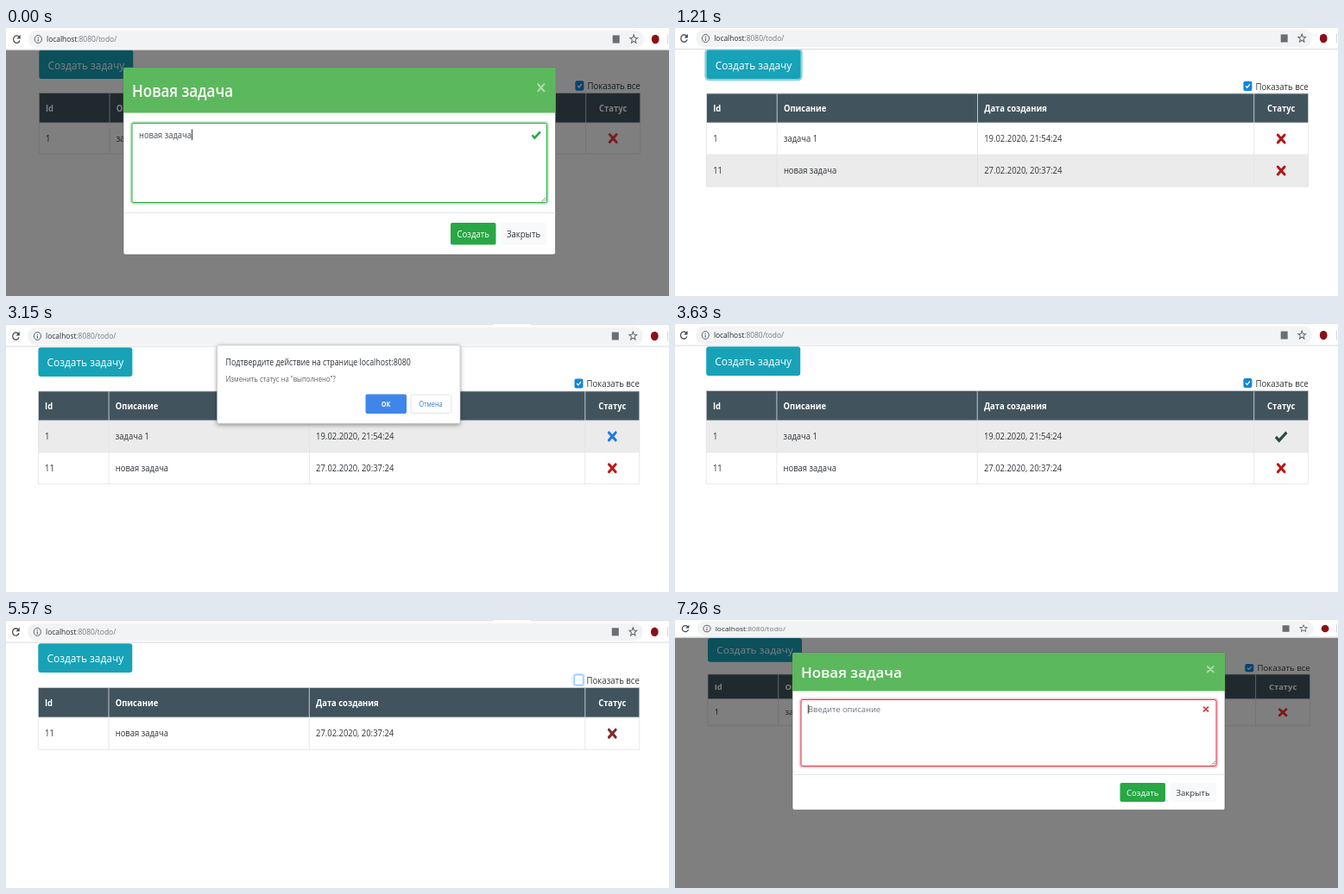
An HTML page that plays this animation: 768 by 311 pixels, repeating every 8470 ms.

```html
<!DOCTYPE html>
<html lang="ru">
<head>
<meta charset="utf-8">
<title>Задачи</title>
<style>
html, body { margin: 0; width: 100%; height: 100%; overflow: hidden; background: #fff; }
svg { display: block; width: 768px; height: 311px; }
text { font-family: "Open Sans", "Noto Sans", sans-serif; white-space: pre; }
.scene { visibility: hidden; animation: show 8.47s step-end infinite; }
@keyframes show {
  0% { visibility: visible; }
  14.2857%, 100% { visibility: hidden; }
}
</style>
</head>
<body>
<svg id="stage" viewBox="0 0 768 311">
  <defs>
    <filter id="shadow" x="-10%" y="-10%" width="120%" height="130%">
      <feDropShadow dx="0" dy="1.5" stdDeviation="2.5" flood-opacity=".4"/>
    </filter>
  </defs>
</svg>
<script>
const HOLD = 1.21;
const SX = 0.625; // the page is shown narrower than it is tall
let sy = 0.7;

const rect = (x, y, w, h, fill, extra = '') =>
  `<rect x="${x}" y="${y}" width="${w}" height="${h}" fill="${fill}" ${extra}/>`;
const line = (x1, y1, x2, y2, color = '#dee2e6', w = 0.8) =>
  `<path d="M${x1} ${y1}L${x2} ${y2}" stroke="${color}" stroke-width="${w}"/>`;
const at = (x, y) => `transform="translate(${x} ${y}) scale(${SX} ${sy})"`;

// Text is centred vertically on y.
function text(x, y, str, { size = 15.1, fill = '#30353a', weight = 400, anchor = 'start' } = {}) {
  return `<text ${at(x, y + size * 0.36 * sy)} font-size="${size}" fill="${fill}" ` +
    `font-weight="${weight}" text-anchor="${anchor}">${str}</text>`;
}
const stroke = (x, y, d, color, w, cap = 'butt') =>
  `<path ${at(x, y)} d="${d}" fill="none" stroke="${color}" stroke-width="${w}" stroke-linecap="${cap}"/>`;

function cross(x, y, color, r = 6.2, w = 4.6) {
  return stroke(x, y, `M${-r} ${-r}L${r} ${r}M${r} ${-r}L${-r} ${r}`, color, w, 'round');
}
const tick = (x, y, color, s = 1) =>
  stroke(x, y, `M${-10 * s} ${s}L${-4 * s} ${7 * s}L${10 * s} ${-6.5 * s}`, color, 5 * s);

function star(x, y) {
  let d = '';
  for (let i = 0; i < 10; i++) {
    const r = i % 2 ? 3.2 : 7.4, a = i * Math.PI / 5;
    d += `${i ? 'L' : 'M'}${(r * Math.sin(a)).toFixed(2)} ${(-r * Math.cos(a)).toFixed(2)}`;
  }
  return stroke(x, y, d + 'Z', '#5f6368', 1.5);
}

function chrome({ left, right, bar, urlY, tabs }) {
  const top = urlY - 14.5 * sy, h = 29 * sy;
  const info = left - 1;
  return rect(0, 0, 768, bar, '#fff') +
    (tabs ? rect(0, 0, 565, 1, '#dee1e6') + rect(607, 0, 161, 1, '#dee1e6') : '') +
    rect(left - 12, top, right - left + 16, h, '#f1f3f4', `rx="9" ry="${h / 2}"`) +
    line(0, bar - 0.5, 768, bar - 0.5, '#d9dbde', 1) +
    stroke(left - 26, urlY, 'M5.2-3A6 6 0 1 0 5.8 2', '#4a4d51', 2) +
    `<path ${at(left - 26, urlY)} d="M7-7.5V-.8H.3Z" fill="#4a4d51"/>` +
    `<ellipse cx="${info}" cy="${urlY}" rx="4.1" ry="${6.5 * sy}" fill="none" stroke="#5f6368"/>` +
    stroke(info, urlY, 'M0-3.6V-1.8M0-.4V4', '#5f6368', 1.8) +
    text(left + 8.7, urlY, 'localhost<tspan fill="#777b80">:8080/todo/</tspan>', { size: 13.5, fill: '#2b2e32' }) +
    rect(right - 32, urlY - 6.5 * sy, 8, 13 * sy, '#6b6f74') +
    star(right - 7.5, urlY) +
    `<ellipse cx="${right + 17.5}" cy="${urlY}" rx="4.4" ry="${7.4 * sy}" fill="#8a0f18"/>` +
    line(766.5, urlY - 8 * sy, 766.5, urlY + 8 * sy, '#d5d7da', 1);
}

function checkbox(x, y, checked) {
  const h = 16 * sy, top = y - h / 2;
  if (checked) {
    return rect(x, top, 10, h, '#0f87dc', 'rx="2"') +
      stroke(x + 5, y, 'M-3.8 0L-1 2.8L4-2.8', '#fff', 2);
  }
  return rect(x - 1, top - 1, 12, h + 2, '#fff', 'rx="3" stroke="#bfdeff" stroke-width="2"') +
    rect(x, top, 10, h, '#fff', 'rx="2" stroke="#80bdff" stroke-width=".8"');
}

function page(s) {
  const { left, right, button, head, rows, dateCol = 314 } = s;
  const width = right - left;
  const cols = [left, left + 81.7, left + dateCol, right - 63];
  const pad = 7.7;
  const headMid = (head[0] + head[1]) / 2;
  const bold = { weight: 700, fill: '#fff' };
  let y = head[1];
  let out = rect(0, 0, 768, 311, '#fff');

  if (s.focus) {
    out += rect(left - 1, button[0] - 1, 111, button[1] - button[0] + 2, 'none',
      'rx="4" stroke="#8bd0db" stroke-width="2.4"');
  }
  out += rect(left, button[0], 109, button[1] - button[0], '#17a2b8', 'rx="3"') +
    text(left + 54.5, (button[0] + button[1]) / 2 + 0.5, 'Создать задачу', { size: 19.1, fill: '#fff', anchor: 'middle' }) +
    checkbox(right - 75.3, s.checkY, !s.unchecked) +
    text(right, s.checkY + 0.5, 'Показать все', { size: 15.4, anchor: 'end' }) +
    rect(left, head[0], width, head[1] - head[0], '#41545d');
  ['Id', 'Описание', 'Дата создания'].forEach((name, i) => {
    out += text(cols[i] + pad, headMid, name, bold);
  });
  out += text(right - 31.5, headMid, 'Статус', { ...bold, anchor: 'middle' });

  for (const { id, name, date, icon, hover } of rows) {
    const mid = y + s.rowH / 2;
    if (hover) out += rect(left, y, width, s.rowH, '#ebebeb');
    out += [id, name, date].map((v, i) => text(cols[i] + pad, mid, v)).join('') +
      (icon === 'done' ? tick(right - 31.5, mid, '#2b4a40') : cross(right - 31.5, mid, icon));
    y += s.rowH;
    out += line(left, y, right, y);
  }
  for (const x of [...cols, right]) out += line(x, head[0], x, y);
  out += line(left, head[0], right, head[0], '#c9d0d4') + line(left, head[1], right, head[1]);
  return out;
}

function modal({ x, w, top, headEnd, area, foot, buttons, end, value, valid }) {
  const r = x + w, color = valid ? '#28a745' : '#dc3545';
  const glow = valid ? '#bfe5c7' : '#f6cdd1';
  const [a, b] = area, [c, d] = buttons;
  const valueY = a + 19 * sy, mid = (c + d) / 2;
  const caret = valid ? x + 79.5 : x + 18.3;
  const label = { size: 15.3, anchor: 'middle' };
  return rect(x, top, w, end - top, '#fff', 'rx="2.5" stroke="#5d5d5d" stroke-width=".6"') +
    `<path d="M${x} ${headEnd}V${top + 2.5}q0-2.5 2.5-2.5H${r - 2.5}q2.5 0 2.5 2.5V${headEnd}Z" fill="#5cb85c"/>` +
    text(x + 10, (top + headEnd) / 2 + 1, 'Новая задача', { size: 27.2, weight: 600, fill: '#fff' }) +
    cross(r - 16.7, top + 33 * sy, '#aedcae', 5.6, 3.2) +
    rect(x + 9, a - 1, w - 18, b - a + 2, 'none', `rx="3" stroke="${glow}" stroke-width="2.6"`) +
    rect(x + 10, a, w - 20, b - a, '#fff', `rx="2" stroke="${color}" stroke-width="1"`) +
    text(x + 18, valueY, value, { size: 15, fill: valid ? '#495057' : '#6c757d' }) +
    line(caret, valueY - 9 * sy, caret, valueY + 9 * sy, '#222', 0.9) +
    (valid ? tick(r - 22.3, valueY, color, 0.75) : cross(r - 22, valueY, '#c9444f', 4, 3.2)) +
    line(r - 16, b - 1, r - 11, b - 6, '#777') + line(r - 13.5, b - 1, r - 11, b - 3.5, '#777') +
    line(x, foot, r, foot) +
    rect(r - 121.5, c, 52.5, d - c, '#28a745', 'rx="2"') +
    rect(r - 63.5, c, 53.5, d - c, '#f8f9fa', 'rx="2"') +
    text(r - 95.3, mid + 0.5, 'Создать', { ...label, fill: '#fff' }) +
    text(r - 37, mid + 0.5, 'Закрыть', label);
}

function confirmBox() {
  const label = { size: 11.6, anchor: 'middle' };
  return rect(244.5, 24.5, 281.5, 91, '#fff', 'rx="2" stroke="#b5b5b5" stroke-width=".6" filter="url(#shadow)"') +
    text(254.5, 44, 'Подтвердите действие на странице localhost:8080', { size: 14.1 }) +
    text(254.5, 64, 'Изменить статус на "выполнено"?', { size: 12.3, fill: '#5f6368' }) +
    rect(416.5, 81.5, 47.5, 22.5, '#3f86ea', 'rx="2"') +
    rect(469, 82, 47, 21.5, '#fff', 'rx="2" stroke="#dadce0" stroke-width=".8"') +
    text(440, 92.8, 'ОК', { ...label, fill: '#fff', weight: 700 }) +
    text(492, 92.8, 'Отмена', { ...label, fill: '#2f7ad0' });
}

const RED = '#b01717';
const first = (icon, hover) => ({ id: '1', name: 'задача 1', date: '19.02.2020, 21:54:24', icon, hover });
const second = (icon, hover) => ({ id: '11', name: 'новая задача', date: '27.02.2020, 20:37:24', icon, hover });

const scenes = [
  { k: 0.704, left: 38.3, right: 734.7, bar: 25.5, urlY: 13, button: [25.5, 59], checkY: 67,
    head: [75.5, 110], rowH: 36, rows: [first('#f03a34')],
    modal: { x: 136, w: 500.5, top: 46, headEnd: 98.5, area: [110.5, 202.5], foot: 214.5,
      buttons: [226, 251.5], end: 263, value: 'новая задача', valid: true } },
  { k: 0.7, left: 36.5, right: 733.7, bar: 25, urlY: 12, button: [25.5, 59], checkY: 67.3, focus: true,
    head: [76, 110], rowH: 37, rows: [first(RED), second(RED, true)] },
  { k: 0.7, left: 37.4, right: 733.8, bar: 26.5, urlY: 14, tabs: true, button: [27.3, 61], checkY: 69,
    head: [78, 112], rowH: 36.8, rows: [first('#1f7ae6', true), second('#c01616')], confirm: true },
  { k: 0.7, left: 36.2, right: 733.7, bar: 25.5, urlY: 13, button: [26.3, 60], checkY: 68.5,
    head: [77.5, 112], rowH: 36.8, rows: [first('done', true), second('#b81616')] },
  { k: 0.7, left: 37.3, right: 733.8, bar: 26.5, urlY: 13.8, tabs: true, button: [27.3, 61], checkY: 69.5, unchecked: true,
    head: [78.5, 113], rowH: 37.3, rows: [second('#84282b')] },
  { k: 0.685, left: 38.5, right: 733.4, bar: 23.5, urlY: 11.2, button: [24, 57], checkY: 65.5, dateCol: 289,
    head: [73.5, 108], rowH: 36.5, rows: [first('#a82024')] },
  { k: 0.58, left: 38, right: 735.6, bar: 20.5, urlY: 10, button: [21, 48.7], checkY: 55.7,
    head: [63, 91.7], rowH: 31, rows: [first('#ff302c')],
    modal: { x: 136, w: 501, top: 38, headEnd: 82.5, area: [92.5, 169.5], foot: 179.5,
      buttons: [189, 211], end: 220.5, value: 'Введите описание', valid: false } },
];

function draw(s, i) {
  sy = s.k;
  return `<g class="scene" style="animation-delay:${((i - scenes.length) * HOLD).toFixed(2)}s">` +
    page(s) +
    (s.modal ? rect(0, 0, 768, 311, '#000', 'opacity=".5"') + modal(s.modal) : '') +
    chrome(s) +
    (s.confirm ? confirmBox() : '') + '</g>';
}

document.getElementById('stage').insertAdjacentHTML('beforeend', scenes.map(draw).join(''));
</script>
</body>
</html>
```
